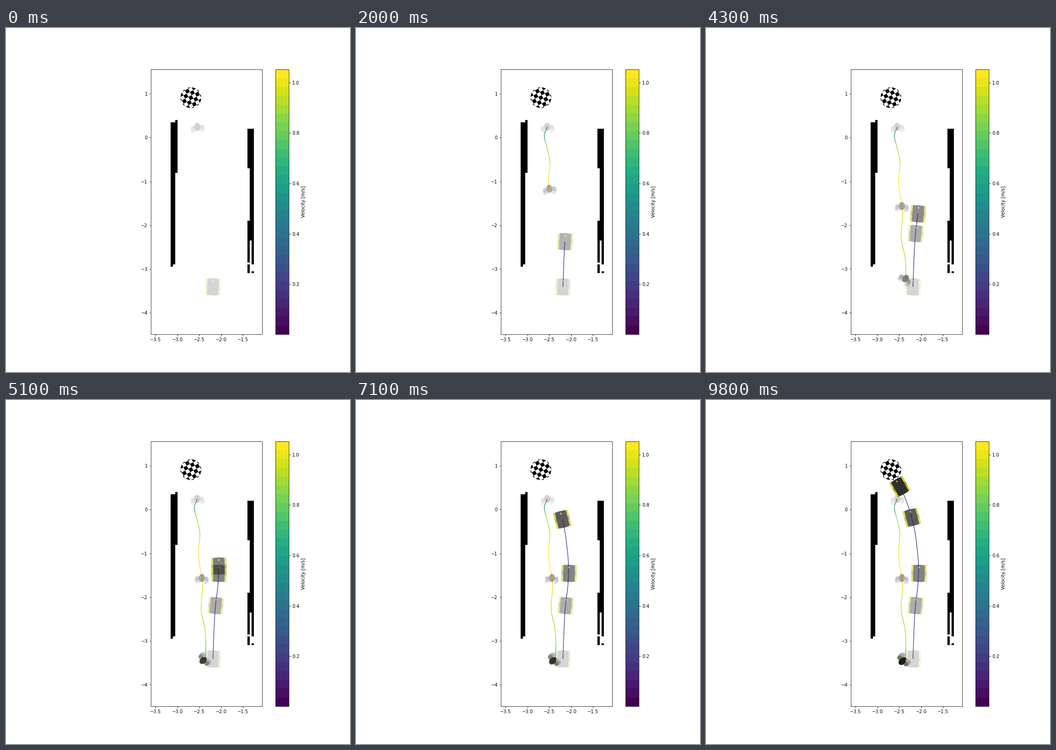
Write a matplotlib script that moves like this. It is 748 px wide and 748 px high and loops after 9.9 s.

```python
import numpy as np
import matplotlib.pyplot as plt
from matplotlib.animation import FuncAnimation
from matplotlib.cm import ScalarMappable
from matplotlib.collections import LineCollection, PolyCollection
from matplotlib.colors import Normalize
from matplotlib.patches import Circle, Rectangle
from matplotlib.transforms import Affine2D

SIZE = 748
DPI = 72
FRAMES = 99
FPS = 10
GHOST_STEP = 24
SUB = 4              # path samples per frame
RES = 2              # sprite samples per pixel
SCALE = 95.1         # pixels per metre
CELL = 0.05          # wall grid in metres

# Routes in screen pixels: (y, x) gives the shape, (frame, y) the progress.
PERSON_ROUTE = [(215, 416), (234, 409.5), (262, 416), (291, 421.7),
                (333, 418.6), (405, 427.4), (452, 424.3), (505, 433.5),
                (530, 434.6), (558, 433.5), (567, 428.5), (569, 426.5)]
PERSON_PACE = [(0, 215), (6, 236), (13, 286), (24, 387), (35, 482),
               (46, 560), (49, 567), (98, 569)]
ROBOT_ROUTE = [(175, 413.5), (206, 430), (256, 447.3), (301, 456.5),
               (370, 462.3), (400, 461), (440, 456.3), (465, 454), (580, 449.3)]
ROBOT_PACE = [(0, 563), (20, 465), (24, 447), (34, 440), (40, 418.5),
              (51, 361), (72, 256), (80, 228.5), (98, 189)]
# column x in metres: spans of y
WALLS = {
    -3.15: [(-2.95, 0.35)], -3.10: [(-2.9, 0.35)], -3.05: [(-0.8, 0.4)],
    -1.40: [(-0.7, 0.2), (-2.85, -1.9), (-3.1, -2.9)],
    -1.35: [(-2.35, 0.2)], -1.30: [(-2.9, 0.2), (-3.1, -3.05)],
}


def smooth(keys, t):
    """Cubic interpolation through the keys without overshoot."""
    x, y = np.array(keys, float).T
    t = np.clip(t, x[0], x[-1])
    h = np.diff(x)
    d = np.diff(y) / h
    prod, total = d[:-1] * d[1:], d[:-1] + d[1:]
    mid = np.where(prod > 0, 2 * prod / np.where(prod > 0, total, 1), 0)
    m = np.concatenate([d[:1], mid, d[-1:]])
    j = np.clip(np.searchsorted(x, t, "right") - 1, 0, len(h) - 1)
    s = (t - x[j]) / h[j]
    return (y[j] * (1 + 2 * s) * (1 - s) ** 2 + y[j + 1] * s**2 * (3 - 2 * s)
            + h[j] * (m[j] * s * (1 - s) ** 2 + m[j + 1] * s**2 * (s - 1)))


def tilt(route, y):
    """Angle of the route against the vertical, in degrees."""
    return -np.degrees(np.arctan(smooth(route, y + 0.5) - smooth(route, y - 0.5)))


def robot_pose(t):
    y = smooth(ROBOT_PACE, t)
    return np.column_stack([smooth(ROBOT_ROUTE, y), y, tilt(ROBOT_ROUTE, y)])


def person_pose(t):
    """Looks a little ahead while walking, then turns around at the end."""
    y = smooth(PERSON_PACE, t)
    s = np.clip((t - 43) / 6, 0, 1)
    turn = s * s * (3 - 2 * s)
    angle = tilt(PERSON_ROUTE, y + 24) * (1 - turn) - 135 * turn
    return np.column_stack([smooth(PERSON_ROUTE, y), y, angle])


class Sprite:
    """Small RGBA picture painted from distance functions."""

    def __init__(self, half):
        self.half = half
        axis = (np.arange(2 * half * RES) + 0.5) / RES - half
        self.x, self.y = np.meshgrid(axis, axis)
        self.rgb = np.full(self.x.shape + (3,), 60.0)
        self.alpha = np.zeros(self.x.shape)

    def paint(self, dist, color):
        cover = np.clip(0.5 - dist * RES, 0, 1)[..., None]
        mixed = self.rgb * (1 - cover) + np.array(color) * cover
        empty = (self.alpha[..., None] == 0) & (cover > 0)
        self.rgb = np.where(empty, color, mixed)
        self.alpha = np.maximum(self.alpha, cover[..., 0])

    def ellipse(self, cx, cy, a, b, color):
        r = np.hypot((self.x - cx) / a, (self.y - cy) / b)
        self.paint((r - 1) * min(a, b), color)

    def box(self, cx, cy, a, b, color):
        dx, dy = np.abs(self.x - cx) - a, np.abs(self.y - cy) - b
        self.paint(np.maximum(dx, dy), color)

    def pixels(self):
        rgba = np.dstack([self.rgb, self.alpha * 255])
        return np.clip(rgba.round(), 0, 255).astype(np.uint8)


def robot_sprite():
    s = Sprite(20)
    for side in (-1, 1):
        s.box(side * 14, 0, 2.2, 17.4, (222, 218, 10))
        s.box(side * 14, 0, 2.2, 4.5, (165, 162, 85))
    curve = 18.3 - (s.x / 12.5) ** 2
    s.paint(np.maximum(np.abs(s.x) - 12.3, np.abs(s.y) - curve), (46, 46, 46))
    tip = np.abs(s.x) * 1.6 - (s.y + 15.5)
    s.paint(np.maximum(tip, s.y + 11.5), (205, 195, 30))
    return s


def person_sprite():
    s = Sprite(20)
    teal, sleeve, skin = (100, 120, 115), (165, 170, 170), (205, 165, 140)
    for side in (-1, 1):
        s.ellipse(side * 11.5, 6.5, 3.4, 5, sleeve)
        s.ellipse(side * 9.5, 2, 5, 5.2, teal)
    s.ellipse(7.5, 10, 2.5, 3, sleeve)
    s.ellipse(-6, 8, 2.6, 2.8, skin)
    s.ellipse(0, 0, 6.6, 8.7, (36, 24, 16))
    return s


def add_sprite(sprite):
    h = sprite.half
    return ax.imshow(sprite.pixels(), extent=(-h, h, -h, h), origin="lower",
                     interpolation="bilinear", zorder=3)


def place(image, pose, frame):
    x, y, angle = pose
    image.set_transform(Affine2D().rotate_deg(angle).translate(x, y) + screen)
    image.set_alpha(0.2 + 0.8 * frame / (FRAMES - 1))


def add_path(pose, gain):
    t = np.arange((FRAMES - 1) * SUB + 1) / SUB
    pts = pose(t)[:, :2]
    steps = np.diff(pts, axis=0)
    speed = gain * np.hypot(*steps.T) * SUB * FPS / SCALE
    lines = LineCollection([], linewidths=1.5, transform=screen, zorder=2)
    ax.add_collection(lines, autolim=False)
    return lines, np.stack([pts[:-1], pts[1:]], axis=1), cmap(norm(speed))


def add_goal(cx, cy, radius, cell, angle):
    square = np.array([(0, 0), (1, 0), (1, 1), (0, 1)]) - 0.5
    cells = [(square + (i, j)) * cell for i in range(-5, 6)
             for j in range(-5, 6) if (i + j) % 2 == 0]
    turn = Affine2D().rotate_deg(angle).translate(cx, cy)
    goal = PolyCollection([turn.transform(c) for c in cells], facecolor="black",
                          linewidth=0, transform=screen)
    ax.add_collection(goal, autolim=False)
    goal.set_clip_path(Circle((cx, cy), radius, transform=screen))


fig, ax = plt.subplots(figsize=(SIZE / DPI, SIZE / DPI), dpi=DPI,
                       facecolor="white")
screen = Affine2D().scale(1, -1).translate(0, SIZE)

cmap = plt.get_cmap("viridis")
norm = Normalize(0.0015, 1.0533)
bands = ScalarMappable(norm, plt.get_cmap("viridis", 30))
fig.colorbar(bands, ax=ax, label="Velocity [m/s]")

for x, spans in WALLS.items():
    for y0, y1 in spans:
        ax.add_patch(Rectangle((x, y0), CELL, y1 - y0, facecolor="black",
                               linewidth=0, antialiased=False))
add_goal(402, 151.5, 22.5, 8, -28)

paths = [add_path(robot_pose, 0.38), add_path(person_pose, 1.07)]
ticks = np.arange(FRAMES, dtype=float)
poses = [robot_pose(ticks), person_pose(ticks)]
sprites = [robot_sprite(), person_sprite()]

ghosts = []
for start in range(0, FRAMES - GHOST_STEP, GHOST_STEP):
    for sprite, pose in zip(sprites, poses):
        image = add_sprite(sprite)
        place(image, pose[start], start)
        ghosts.append((start, image))
movers = [add_sprite(sprite) for sprite in sprites]

ax.set_aspect("equal")
ax.set_xlim(-3.606, -1.059)
ax.set_ylim(-4.4925, 1.5638)
ax.set_xticks(np.arange(-3.5, -1.4, 0.5))
ax.set_yticks(range(-4, 2))


def update(frame):
    for lines, segments, colors in paths:
        lines.set_segments(segments[:frame * SUB])
        lines.set_color(colors[:frame * SUB])
    for start, image in ghosts:
        image.set_visible(frame > start)
    for image, pose in zip(movers, poses):
        place(image, pose[frame], frame)
    return []


anim = FuncAnimation(fig, update, frames=FRAMES, interval=1000 / FPS,
                     init_func=lambda: update(0), repeat=True, repeat_delay=0)
plt.show()
```
